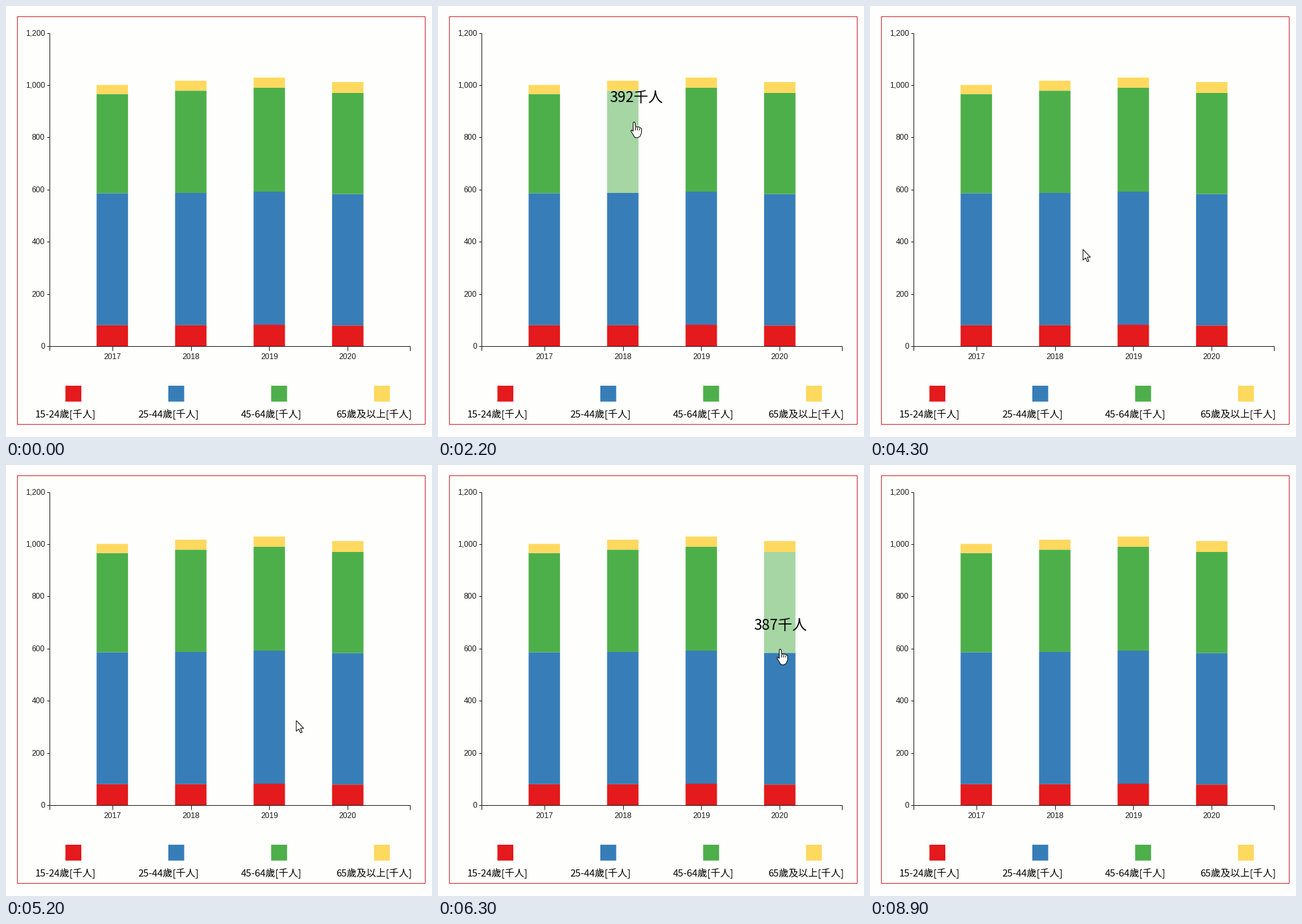
Animation of 656x664 px, one loop 9 s. Source, as a matplotlib script:

```python
import matplotlib.pyplot as plt
import numpy as np
from matplotlib.animation import FuncAnimation
from matplotlib.patches import Polygon, Rectangle

W, H, DPI = 656, 664, 64
FRAMES, INTERVAL = 90, 100
PAPER, INK = "#fefefd", "#1c1c1c"
COLORS = ["#e41a1c", "#377eb8", "#4daf4a", "#ffd95f"]
GROUPS = ["15-24歲", "25-44歲", "45-64歲", "65歲及以上"]
DATA = {2017: [80, 506, 380, 35], 2018: [80, 507, 392, 38],
        2019: [82, 510, 398, 39], 2020: [79, 504, 387, 42]}
X0, X1, Y0, Y_TOP = 67, 622, 524, 41.5
STEP = 556 / 4.6
BAR_W = 0.4 * STEP
CJK, SANS = "Noto Sans CJK JP", "Liberation Sans"

# Pointer moves: first frame, last frame, evenly timed way points
MOVES = [
    (4, 13, [(172, 2), (367, 112), (305, 178), (278, 183)]),
    (14, 15, [(287, 181), (299, 178)]),
    (20, 26, [(300, 179), (302, 179), (388, 160), (398, 158)]),
    (32, 36, [(385, 200), (344, 306), (304, 322)]),
    (43, 47, [(328, 375), (388, 382), (406, 388)]),
    (51, 55, [(424, 392), (516, 399)]),
    (59, 63, [(524, 371), (527, 284)]),
    (67, 70, [(530, 258), (540, 228)]),
    (72, 77, [(522, 217), (528, 133)]),
    (88, 88, [(484, 54)]),
]

HAND = [(-1.5, 14), (-1.5, 1), (0, -0.5), (1.5, 1), (2, 7), (8, 7.5), (11.5, 10),
        (11.5, 16), (9, 22), (5, 24), (1, 23.5), (-5, 13.5), (-4, 12)]
ARROW = [(0, 0), (0, 16.5), (4, 13), (6.5, 19), (9, 18), (6.5, 12), (11.5, 12)]
BEAM = [(-3, -8), (3, -8), (0, -8), (0, 8), (-3, 8), (3, 8)]


def px(size):
    return size * 72 / DPI


def y_at(value):
    return Y0 - value * (Y0 - Y_TOP) / 1200


fig = plt.figure(figsize=(W / DPI, H / DPI), dpi=DPI, facecolor=PAPER)
ax = fig.add_axes([0, 0, 1, 1])
ax.set_xlim(0, W)
ax.set_ylim(H, 0)
ax.axis("off")


def line(xs, ys, color=INK, z=2):
    return ax.plot(xs, ys, color=color, lw=px(1), zorder=z,
                   solid_capstyle="butt")[0]


def label(x, y, text, size, font, ha="center", color=INK, z=3):
    return ax.text(x, y, text, fontsize=px(size), family=font, ha=ha,
                   va="baseline", color=color, zorder=z)


def box(x, y, w, h, color):
    return ax.add_patch(Rectangle((x, y), w, h, fc=color, lw=0, snap=False))


ax.add_patch(Rectangle((17, 16), 628, 628, fill=False, ec="#c9252b", lw=px(1)))

# Stacked bars, keyed by (year, series)
bars = {}
for i, (year, values) in enumerate(DATA.items()):
    left = X0 + (0.6 + i) * STEP
    tops = [y_at(v) for v in np.cumsum([0] + values)]
    for s, color in enumerate(COLORS):
        bars[year, s] = box(left, tops[s + 1], BAR_W, tops[s] - tops[s + 1], color)
    mid = left + BAR_W / 2
    line([mid, mid], [Y0, 531])
    label(mid, 544, str(year), 12, SANS)

# Axes
line([X0, X0], [Y_TOP, Y0])
line([X0, X0, X1, X1], [531, Y0, Y0, 531])
for v in range(0, 1201, 200):
    line([63, X0], [y_at(v)] * 2)
    label(60, y_at(v) + 4, f"{v:,}", 12, SANS, ha="right")

# Legend
for s, name in enumerate(GROUPS):
    x = 91.5 + s * 158.4
    box(x, 585, 24.5, 24.5, COLORS[s])
    label(x, 634, name + "[千人]", 15, CJK, color="black")

tip = label(0, 0, "", 22.4, CJK, color="black", z=5)
pointer = ax.add_patch(Polygon(HAND, closed=True, fc="white", ec="black",
                               lw=px(1), zorder=6))
beam = line([], [], "#7d8a86", z=6)
creases = [line([], [], "black", z=7) for _ in range(3)]


def hit(x, y):
    for key, bar in bars.items():
        left, top = bar.get_xy()
        if 0 <= x - left < BAR_W and 0 <= y - top < bar.get_height():
            return key
    return None


def pointer_at(f):
    """The tip's place; between moves it rests where the last one ended."""
    done = [m for m in MOVES if m[0] <= f]
    if not done or f == FRAMES - 1:
        return None
    start, stop, points = done[-1]
    times = np.linspace(start, stop, len(points))
    return tuple(np.interp(f, times, axis) for axis in zip(*points))


def plan():
    """Pointer, its shape, highlighted bar and label anchor for every frame.

    The label is placed once, where the pointer enters a bar. Touching the
    label counts as leaving the bar.
    """
    states, key, anchor = [], None, None
    for f in range(FRAMES):
        pos = pointer_at(f)
        if pos is None:
            states.append((None, None, None, None))
            continue
        over, shape = hit(*pos), None
        if key:
            dx, dy = pos[0] - anchor[0], pos[1] - anchor[1]
            if abs(dx) < 40 and -18 < dy < 6:
                over, shape = None, "beam" if dy < 0 else "hand"
        if over != key:
            key, anchor = over, (pos[0], pos[1] - 30)
        states.append((pos, shape or ("hand" if key else "arrow"), key, anchor))
    return states


STATES = plan()


def draw(f):
    pos, shape, key, anchor = STATES[f]
    for k, bar in bars.items():
        bar.set_alpha(0.5 if k == key else 1)
    tip.set_visible(key is not None)
    if key:
        year, s = key
        tip.set_text(f"{DATA[year][s]}千人")
        tip.set_position(anchor)

    pointer.set_visible(shape in ("hand", "arrow"))
    beam.set_visible(shape == "beam")
    for i, crease in enumerate(creases):
        crease.set_visible(shape == "hand")
        if shape == "hand":
            crease.set_data([pos[0] + 2 + 3 * i] * 2, [pos[1] + 7 + i, pos[1] + 12])
    if shape == "beam":
        beam.set_data(*(np.add(BEAM, pos).T))
    elif shape:
        pointer.set_xy(np.add(HAND if shape == "hand" else ARROW, pos))
    return []


anim = FuncAnimation(fig, draw, frames=FRAMES, init_func=lambda: draw(0),
                     interval=INTERVAL, repeat=True, repeat_delay=0,
                     cache_frame_data=False)
plt.show()
```
